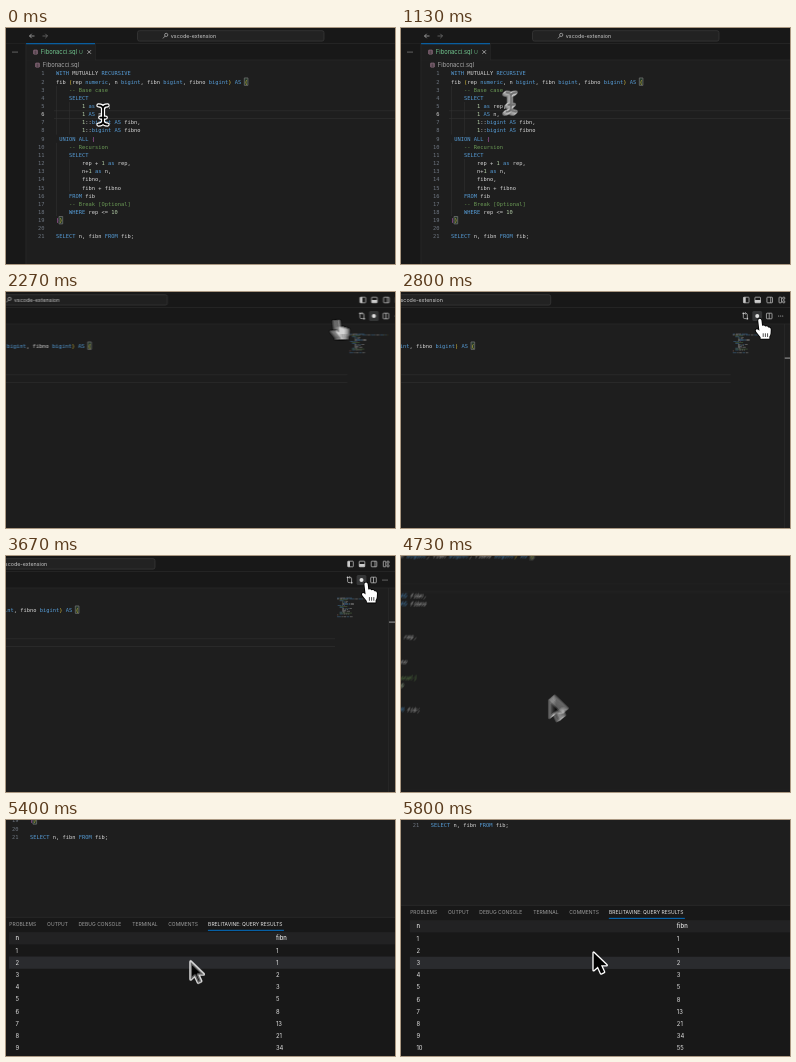
An HTML page with a canvas that plays this animation: 389x236 px, repeating every 5870 ms.

```html
<!DOCTYPE html>
<html lang="en">
<head>
<meta charset="utf-8">
<title>Recursive query in an editor</title>
<style>
html, body { margin: 0; width: 100%; height: 100%; overflow: hidden; background: #1e1e1e; }
canvas { display: block; }
</style>
</head>
<body>
<canvas id="stage" width="389" height="236"></canvas>
<script>
const W = 389, H = 236, LOOP = 5870, STEP = 1000 / 15;
const SCENE_W = 558, SCENE_H = 450;
const MONO = '"DejaVu Sans Mono", monospace';
const SANS = 'Inter, sans-serif';
const CHAR = 3.25, LINE = 8.15, CODE_X = 50, CODE_Y = 45.5;
const ROW = 12.2, TABLE_X = 29, HEAD_Y = 310;
const BLUE = '#569cd6', PLAIN = '#d4d4d4', GOLD = '#e8c83c';

const stage = document.getElementById('stage').getContext('2d');
const buffer = document.createElement('canvas');
buffer.width = SCENE_W;
buffer.height = SCENE_H;
const bufferCtx = buffer.getContext('2d');

const code = `WITH MUTUALLY RECURSIVE
fib (rep numeric, n bigint, fibn bigint, fibno bigint) AS (
    -- Base case
    SELECT
        1 as rep,
        1 AS n,
        1::bigint AS fibn,
        1::bigint AS fibno
 UNION ALL (
    -- Recursion
    SELECT
        rep + 1 as rep,
        n+1 as n,
        fibno,
        fibn + fibno
    FROM fib
    -- Break [Optional]
    WHERE rep <= 10
))

SELECT n, fibn FROM fib;`.split('\n');

// Splits the query into coloured tokens placed by line and column.
const tokens = [];
let depth = 0;
const keyword = /^(with|recursive|as|select|union|all|from|where|numeric|bigint)$/i;
code.forEach((line, row) => {
  for (const m of line.matchAll(/--.*|[a-z]+|\d+|[()]|[^\sa-z\d()]+/gi)) {
    const s = m[0];
    let color = PLAIN;
    if (s.startsWith('--')) color = '#6a9955';
    else if (keyword.test(s)) color = BLUE;
    else if (/^\d/.test(s)) color = '#b5cea8';
    else if (s === '(') color = depth++ ? '#da70d6' : GOLD;
    else if (s === ')') color = --depth ? '#da70d6' : GOLD;
    tokens.push({ s, row, col: m.index, color });
  }
});

const lineY = row => CODE_Y + row * LINE;

function rect(c, x, y, w, h, color) {
  c.fillStyle = color;
  c.fillRect(x, y, w, h);
}

function box(c, x, y, w, h, r, fill, line) {
  c.beginPath();
  c.roundRect(x, y, w, h, r);
  if (fill) { c.fillStyle = fill; c.fill(); }
  if (line) { c.strokeStyle = line; c.lineWidth = 0.7; c.stroke(); }
}

function path(c, d, color, width = 0.7) {
  c.strokeStyle = color;
  c.lineWidth = width;
  c.stroke(new Path2D(d));
}

function circle(c, x, y, r, color) {
  c.fillStyle = color;
  c.beginPath();
  c.arc(x, y, r, 0, 7);
  c.fill();
}

// Sets small type from a larger size so that advances stay fractional.
function text(c, s, x, y, size, color, font = SANS, align = 'left', weight = 400) {
  c.save();
  c.translate(x, y + size * 0.36);
  c.scale(0.1, 0.1);
  c.font = `${weight} ${size * 10}px ${font}`;
  c.textAlign = align;
  c.fillStyle = color;
  c.fillText(s, 0, 0);
  c.restore();
}

function dots(c, x, y) {
  for (let i = -1; i < 2; i++) circle(c, x + i * 2, y, 0.55, '#c0c0c0');
}

function titleBar(c) {
  rect(c, 0, 0, SCENE_W, 32, '#181818');
  rect(c, 0, 15, SCENE_W, 0.7, '#2a2a2a');
  box(c, 131.5, 2.7, 186.5, 10.4, 2, '#222222', '#3c3c3c');
  path(c, 'M28.5 8H23.5M25.7 5.8L23.5 8L25.7 10.2', '#bbb');
  path(c, 'M36.5 8H41.5M39.3 5.8L41.5 8L39.3 10.2', '#777');
  path(c, 'M161.8 6.9A1.6 1.6 0 1 1 158.6 6.9A1.6 1.6 0 1 1 161.8 6.9M159 8.1L157 10.4', '#bbb');
  text(c, 'vscode-extension', 164.8, 8, 5.35, '#cccccc');

  const frame = x => box(c, x - 2.8, 5.2, 5.6, 5.6, 0.6, null, '#cccccc');
  [513.5, 525, 537].forEach(frame);
  rect(c, 510.7, 5.2, 2.3, 5.6, '#cccccc');
  rect(c, 522.2, 8, 5.6, 2.8, '#cccccc');
  path(c, 'M538 5.2V10.8', '#ccc');
  box(c, 546.3, 5.2, 2.5, 5.6, 0.4, null, '#ccc');
  box(c, 550, 5.2, 2, 2, 0.4, null, '#ccc');
  box(c, 550, 8.8, 2, 2, 0.4, null, '#ccc');
}

function fileIcon(c, x, y) {
  path(c, `M${x - 1.7} ${y - 1.8}h3.4v3.8h-3.4zM${x - 1.7} ${y}h3.4`, '#b88aa5', 0.7);
}

function tabBar(c, t) {
  rect(c, 20, 31.6, SCENE_W, 0.7, '#2a2a2a');
  rect(c, 20, 15.5, 69, 17, '#1e1e1e');
  rect(c, 20, 15.3, 69, 0.9, '#0078d4');
  rect(c, 89, 16, 0.6, 16, '#2a2a2a');
  fileIcon(c, 29.5, 24);
  text(c, 'Fibonacci.sql', 34.8, 24, 5.8, '#73c991');
  text(c, 'U', 73, 24, 5.2, '#5fa878');
  path(c, 'M81.4 22.2L85 25.8M85 22.2L81.4 25.8', '#ccc');
  dots(c, 9, 24);

  if (t > 2100 && t < 4060) box(c, 519.6, 19, 9.8, 10, 1.5, '#353637');
  path(c, 'M510.6 21.5V25.4Q510.6 26.6 512 26.6H513.5M514.6 26.5V22.6Q514.6 21.4 513.2 21.4H511.8M513 20.2L511.8 21.4L513 22.6', '#ccc');
  circle(c, 510.6, 21.3, 0.9, '#ccc');
  circle(c, 514.6, 26.7, 0.9, '#ccc');
  circle(c, 524.5, 24, 2, '#e0e0e0');
  box(c, 533.7, 21.2, 5.6, 5.6, 0.6, null, '#cccccc');
  path(c, 'M536.5 21.2V26.8', '#ccc');
  dots(c, 548, 24);
}

function editor(c) {
  fileIcon(c, 31.5, 37);
  text(c, 'Fibonacci.sql', 36.8, 37, 5.8, '#a9a9a9');

  rect(c, 48, 82.4, 450, 0.8, '#2c2c2c');
  rect(c, 48, 90, 450, 0.8, '#2c2c2c');
  rect(c, CODE_X, lineY(1.5), 0.5, LINE * 6, '#333');
  rect(c, CODE_X, lineY(8.5), 0.5, LINE * 9, '#333');
  for (const row of [3.5, 10.5]) rect(c, CODE_X + 4 * CHAR, lineY(row), 0.5, LINE * 4, '#333');

  // Matching outer brackets
  for (const [col, row] of [[58, 1], [1, 18]]) {
    box(c, CODE_X + col * CHAR - 0.2, lineY(row) - 3.7, CHAR + 0.4, 7.4, 0, '#26382b', '#777');
  }
  code.forEach((_, row) => {
    text(c, row + 1, 38.5, lineY(row), 5.4, row === 5 ? '#cccccc' : '#6e7681', MONO, 'right');
  });
  for (const k of tokens) {
    text(c, k.s, CODE_X + k.col * CHAR, lineY(k.row), 5.4, k.color, MONO);
  }

  // Minimap and scroll bar
  c.globalAlpha = 0.5;
  for (const k of tokens) {
    rect(c, 500 + k.col * 0.65, 41.7 + k.row * 0.94, k.s.length * 0.65, 0.65, k.color);
  }
  c.globalAlpha = 1;
  rect(c, 551.3, 32, 0.6, 257, '#2c2c2c');
  rect(c, 552, 65.5, 6, 1.2, '#8a8a8a');
}

const panelTabs = [
  ['PROBLEMS', 29.3], ['OUTPUT', 67.2], ['DEBUG CONSOLE', 98.5], ['TERMINAL', 152.4],
  ['COMMENTS', 188.3], ['BRELITAVINE: QUERY RESULTS', 228.2]
];

function panel(c, t) {
  rect(c, 20, 289, SCENE_W, 170, '#181818');
  rect(c, 20, 288.6, SCENE_W, 0.8, '#2b2b2b');
  panelTabs.forEach(([name, x], i) => {
    text(c, name, x, 296.2, 5, i === 5 ? '#e7e7e7' : '#9d9d9d');
  });
  rect(c, 228, 301.6, 76, 0.9, '#0078d4');

  const band = (y, color) => rect(c, TABLE_X, y - ROW / 2, SCENE_W, ROW, color);
  band(HEAD_Y, '#222223');
  if (t > 5230) band(HEAD_Y + ROW * (t < 5560 ? 2 : 3), '#2a2b2e');
  const cells = (a, b, y, weight) => {
    text(c, a, 35.6, y, 5.9, '#e4e4e4', SANS, 'left', weight);
    text(c, b, 296, y, 5.9, '#e4e4e4', SANS, 'left', weight);
  };
  cells('n', 'fibn', HEAD_Y, 500);
  for (let n = 1, a = 1, b = 1; n <= 11; n++, [a, b] = [b, a + b]) {
    cells(n, a, HEAD_Y + n * ROW, 400);
  }
}

function drawScene(c, t) {
  rect(c, 0, 0, SCENE_W, SCENE_H, '#1e1e1e');
  titleBar(c);
  rect(c, 0, 15.7, 20, SCENE_H, '#181818');
  tabBar(c, t);
  rect(c, 19.6, 15.7, 0.7, SCENE_H, '#2b2b2b');
  editor(c);
  panel(c, t);
}

// Critically damped spring from 0 to 1
function spring(t, start, rate) {
  const u = Math.max(0, (t - start) / 1000 * rate);
  return 1 - (1 + u) * Math.exp(-u);
}

function camera(t) {
  return {
    x: 169 * spring(t, 1581, 6.24) - 150.1 * spring(t, 4465, 5.13),
    y: 206.5 * spring(t, 4533, 4.97)
  };
}

// Pointer hotspots: time, x, y
const toButton = [
  [970, 97, 87], [1270, 132, 60], [1530, 205, 41], [1730, 280, 43],
  [2270, 488, 28], [2530, 519, 28], [2900, 528, 27], [3470, 529, 27]
];
const toTable = [
  [3960, 529, 27], [4270, 466, 90], [4530, 350, 162], [4730, 260, 194],
  [5070, 213, 298], [5400, 210, 332], [5800, 212, 335]
];

function along(keys, t) {
  const last = keys.length - 1;
  if (t <= keys[0][0]) return keys[0].slice(1);
  if (t >= keys[last][0]) return keys[last].slice(1);
  const i = keys.findIndex(k => k[0] > t) - 1;
  const a = keys[i], b = keys[i + 1], span = b[0] - a[0], s = (t - a[0]) / span;
  const slope = (j, d) => j < 1 || j >= last ? 0
    : (keys[j + 1][d] - keys[j - 1][d]) / (keys[j + 1][0] - keys[j - 1][0]);
  return [1, 2].map(d => {
    const h = s * s * (3 - 2 * s);
    return a[d] + (b[d] - a[d]) * h
      + span * s * (1 - s) * ((1 - s) * slope(i, d) - s * slope(i + 1, d));
  });
}

const pointer = t => along(t < 3900 ? toButton : toTable, t);

const arrow = new Path2D('M.8 1.4V19L5 15.2L8.2 22.2L11.2 20.8L8.1 14H13.8Z');
const hand = new Path2D('M-1.6 1.2Q-1.6-.4 0-.4Q1.6-.4 1.7 1.2L2.3 6.6Q4.6 5.5 5.4 7.3Q7.7 6.4 8.5 8.3Q10.9 7.8 11 10.3L10.8 14.2Q10.5 16 9.6 17.3V19.6H.8V18L-3.6 12.6Q-4.8 10.6-3.2 10Q-1.8 9.7-.4 11.6Z');
const beam = new Path2D('M-4.6-9.6Q-.6-9.6 0-6.8Q.6-9.6 4.6-9.6M0-7V7M-4.6 9.6Q-.6 9.6 0 6.8Q.6 9.6 4.6 9.6M-2.8 2.6H2.8');

function drawPointer(c, t) {
  c.lineJoin = c.lineCap = 'round';
  const outline = (shape, line, width, fill) => {
    c.strokeStyle = line;
    c.lineWidth = width;
    c.stroke(shape);
    if (fill) { c.fillStyle = fill; c.fill(shape); }
  };
  if (t < 1230) {
    outline(beam, '#fff', 4.2);
    outline(beam, '#000', 1.8);
  } else if (t > 2100 && t < 4060) {
    outline(hand, '#000', 1.6, '#fff');
    path(c, 'M3.4 14.5V17.4M5.6 14.5V17.4M7.8 14.5V17.4', '#222', 0.8);
  } else {
    outline(arrow, '#fff', 2.6, '#000');
  }
  c.lineCap = 'butt';
  c.lineJoin = 'miter';
}

function render(t) {
  const cam = camera(t);
  const shutter = t < 4000 ? 18 : 7;
  const before = camera(t - shutter);
  const dx = cam.x - before.x, dy = cam.y - before.y;
  const smear = Math.hypot(dx, dy);
  if (smear < 1) {
    stage.save();
    stage.translate(-cam.x, -cam.y);
    drawScene(stage, t);
    stage.restore();
  } else {
    drawScene(bufferCtx, t);
    const n = Math.ceil(smear) + 2;
    for (let i = 0; i < n; i++) {
      const f = i / (n - 1) - 0.5;
      stage.globalAlpha = 1 / (i + 1);
      stage.drawImage(buffer, -cam.x - dx * f, -cam.y - dy * f);
    }
    stage.globalAlpha = 1;
  }

  const [px, py] = pointer(t), [qx, qy] = pointer(t - 20);
  const trail = Math.hypot(px - qx, py - qy);
  const copies = trail < 0.6 ? 1 : Math.ceil(trail) + 2;
  for (let i = 0; i < copies; i++) {
    const f = copies > 1 ? i / (copies - 1) - 0.5 : 0;
    stage.save();
    stage.globalAlpha = Math.min(1, 1.5 / copies);
    stage.translate(px - cam.x + (px - qx) * f, py - cam.y + (py - qy) * f);
    drawPointer(stage, t);
    stage.restore();
  }
}

const began = performance.now();
let shown = -1;
function tick() {
  const t = (performance.now() - began) % LOOP;
  const step = Math.floor((t + 5) / STEP) % 88;
  if (step !== shown) {
    shown = step;
    render(step * STEP);
  }
  requestAnimationFrame(tick);
}
tick();
</script>
</body>
</html>
```
